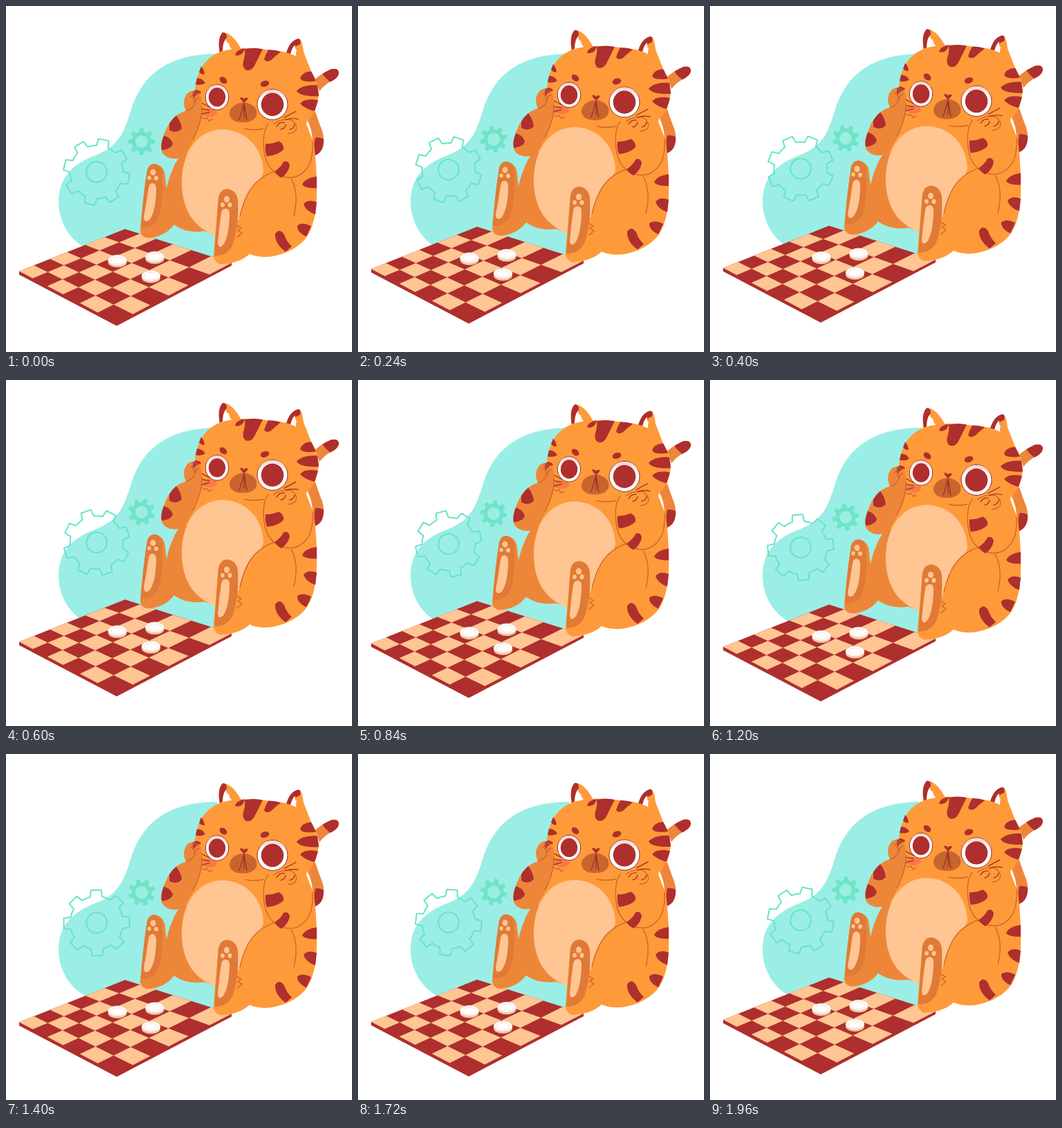
Write an HTML page that moves like this. It is 500 by 500 pixels and loops after 2 s.

```html
<!DOCTYPE html>
<html lang="en">
<head>
<meta charset="utf-8">
<title>Cat at the board</title>
<style>
html, body { margin: 0; width: 100%; height: 100%; overflow: hidden; background: #fff; }
svg { display: block; width: 100vw; height: 100vh; }
.main { fill: #fe9a39; }
.shade { fill: #ee8639; }
.sole { fill: #e07a36; }
.dark { fill: #ae2f2d; }
.peach { fill: #ffc592; }
.white { fill: #fff; }
.line { fill: none; stroke: #c8602c; stroke-width: 1.2; stroke-linecap: round; stroke-linejoin: round; }
.ink { fill: none; stroke: #9b2a26; stroke-width: 1.2; stroke-linecap: round; stroke-linejoin: round; }
</style>
</head>
<body>
<svg viewBox="0 0 500 500">
  <defs>
    <g id="piece">
      <ellipse cy="3" rx="13.5" ry="7.5" fill="#f3c6a2"/>
      <ellipse rx="13.5" ry="7.5" class="white" stroke="#ecd0bd" stroke-width=".8"/>
      <ellipse cy=".4" rx="9.5" ry="5" fill="none" stroke="#f0ddd2" stroke-width=".9"/>
    </g>
    <clipPath id="tailClip"><path d="M447 105Q458 96 470 91Q480 89 481 96Q481 102 473 107Q460 113 453 123Z"/></clipPath>
  </defs>

  <path fill="#9beee5" d="M305 69C235 69 198 99 182 146C171 181 165 203 126 217C90 232 76 252 76 284C77 316 94 342 125 355L312 370L340 180Z"/>

  <g id="scene">
    <g fill="none" stroke="#67e4c6" stroke-width="2" stroke-linejoin="round" transform="translate(131 239.5)">
      <path id="bigGear"/>
      <circle r="14.8"/>
    </g>
    <g transform="translate(196 195.7)"><path id="smallGear" fill="#70e4c6" fill-rule="evenodd"/></g>

    <path class="dark" d="M19 383L172 322L326 371V375L160 462L19 388Z"/>
    <path id="cells" class="peach"/>
    <use href="#piece" x="161" y="367"/>
    <use href="#piece" x="215" y="362"/>
    <use href="#piece" x="209.5" y="389.5"/>

    <!-- tail -->
    <path class="shade" d="M447 105Q458 96 470 91Q480 89 481 96Q481 102 473 107Q460 113 453 123Z"/>
    <path class="dark" clip-path="url(#tailClip)" d="M454 92Q459 103 472 112L490 105V85H454Z"/>
    <path class="shade" d="M437 158L447 152Q452 168 457 180Q462 196 456 206Q452 214 444 217L441 201Q446 190 434 164Z"/>
    <path class="dark" d="M447 190Q453 189 459 192Q460 211 446 216Q444 203 447 190Z"/>

    <!-- body and far leg -->
    <path class="main" d="M284 158Q272 184 259 212Q244 252 251 300Q257 321 285 324L304 331L335 357H350Q363 364 382 362Q413 357 431 338Q451 316 449 255Q448 196 436 160Z"/>
    <path class="shade" d="M259 212Q247 218 240 238Q228 264 230 302L243 316Q262 329 286 325L304 331L275 240Z"/>
    <path class="shade" d="M204 237Q207 227 216 228Q229 231 230 246Q231 266 238 282L251 300Q240 332 206 335Q194 334 194 323Q198 275 204 237Z"/>
    <path class="sole" d="M204 237Q207 227 216 228Q226 231 226 246Q227 288 220 307Q212 322 195 320Q198 275 204 237Z"/>
    <path class="peach" d="M210 256Q218 254 217 268Q216 298 207 309Q200 314 199 305Q203 284 206 262Q207 257 210 256Z"/>
    <g class="peach">
      <ellipse cx="212.500" cy="240" rx="4" ry="4.500"/>
      <ellipse cx="207" cy="248" rx="2.700" ry="3"/>
      <ellipse cx="217" cy="248.500" rx="3" ry="3.200"/>
    </g>
    <path class="peach" d="M312 178C345 178 371 203 372 240L350 300L330 330L304 332C268 319 253 290 254 250C256 208 278 179 312 178Z"/>

    <!-- near leg -->
    <path class="main" d="M388 239Q362 248 350 270Q341 287 336 310L307 276L300 357Q299 369 309 373Q338 372 353 357L400 300Z"/>
    <path class="line" d="M388 239Q362 248 350 270Q342 285 338 304M412 249Q424 271 416 303"/>
    <path class="sole" d="M307 276Q310 264 320 264Q333 266 335 280Q337 318 327 346Q319 361 301 361Q304 318 307 276Z"/>
    <path class="peach" d="M315 293Q324 290 323 303Q322 333 314 345Q307 352 306 342Q308 319 311 299Q312 294 315 293Z"/>
    <g class="peach">
      <ellipse cx="319" cy="279" rx="4" ry="4.600"/>
      <ellipse cx="313" cy="287" rx="2.800" ry="3.200"/>
      <ellipse cx="323.500" cy="287" rx="3" ry="3.500"/>
    </g>
    <path class="line" d="M334 317L340 321L335 324L341 328L334 334"/>

    <!-- back stripes -->
    <g class="dark">
      <path d="M449 246Q433 248 428 257Q430 263 449 263Z"/>
      <path d="M449 283Q436 278 430 286Q433 296 447 301Z"/>
      <path d="M441 318Q428 311 421 317Q420 326 434 333Z"/>
      <path d="M413 347Q405 340 402 330Q395 320 389 329Q388 343 404 355Z"/>
    </g>

    <!-- ears -->
    <path class="main" d="M308 67Q306 47 313 38Q326 37 340 62L330 72Z"/>
    <path class="dark" d="M309 66Q305 46 313 38Q319 37 319 45Q315 51 315 64Z"/>
    <path class="white" d="M313 66Q313 52 318 47Q318 53 322 53Q322 58 327 63Z"/>
    <path class="main" d="M404 74Q410 50 423 47Q428 48 430 66L441 94Z"/>
    <path class="dark" d="M404 71Q409 50 422 47Q427 47 425 55Q413 59 411 73Z"/>
    <path class="white" d="M410 75Q412 60 418 56Q417 62 420 64Q418 68 420 78Z"/>

    <!-- head -->
    <path class="main" d="M273 126C273 97 288 68 322 63Q345 58 385 64Q423 66 437 89Q450 104 452 126Q450 151 437 165Q415 182 350 180Q294 181 279 154Q273 144 273 126Z"/>
    <g class="dark">
      <path d="M331 70Q333 63 345 61Q343 70 336 71Q332 72 331 70Z"/>
      <path d="M345 62Q358 59 371 62Q366 72 359 86Q354 95 346 92Q340 87 344 76Q346 68 345 62Z"/>
      <path d="M379 63Q390 63 397 66Q389 72 383 78Q376 82 373 77Q375 70 379 63Z"/>
      <path d="M282 87Q286 91 287 98Q283 100 279 95Z"/>
      <path d="M276 104Q284 104 288 111Q283 115 274 113Z"/>
      <path d="M273 121Q280 121 282 125Q279 128 273 127Z"/>
      <path d="M441 94Q428 95 425 104Q428 111 448 108Z"/>
      <path d="M450 114Q429 113 420 122Q424 131 452 130Z"/>
      <path d="M451 136Q432 132 425 141Q432 148 446 152Z"/>
      <ellipse cx="314" cy="107" rx="6" ry="4.200" transform="rotate(40 314 107)"/>
      <ellipse cx="374" cy="112" rx="6.500" ry="4.300" transform="rotate(-18 374 112)"/>
    </g>
    <ellipse cx="294" cy="154" rx="11" ry="6" fill="#fb7a43"/>
    <g stroke="#9b2a26">
      <ellipse cx="305" cy="131.500" rx="16.700" ry="18.200" class="white"/>
      <ellipse cx="385" cy="142" rx="22" ry="22" class="white"/>
    </g>
    <path fill="#f7dcda" d="M289 128Q292 114 305 114Q318 115 321 128Q314 118 305 118Q295 118 289 128ZM364 137Q369 120.500 385 120.500Q402 121 406 137Q398 125 385 125Q371 125 364 137Z"/>
    <ellipse class="dark" cx="305" cy="131.500" rx="12.200" ry="13.700"/>
    <ellipse class="dark" cx="385" cy="142" rx="16.300" ry="16.700"/>
    <path fill="#c8652f" d="M343 139Q350 139 357 144Q364 149 362 158Q358 168 342 168Q326 168 323 157Q322 148 332 142Q338 139 343 139Z"/>
    <path class="dark" d="M338 132Q342 131 344 134Q346 131 350 133Q347 138 344 139Q340 137 338 132Z"/>
    <path class="ink" d="M344 137V141L337 164M344 141L348 164M344 142V161M281 139L295 146M281 148L294 150M283 156L294 153"/>
    <path class="line" d="M345 177Q358 180 372 177M282 160L287 163L290 161L294 166L298 163"/>

    <!-- far arm -->
    <path class="shade" d="M263 125Q272 119 280 126Q284 134 283 148Q284 165 273 188Q265 208 254 219Q235 224 226 212Q221 201 231 179Q240 157 260 151Q253 136 263 125Z"/>
    <path class="dark" d="M236 170Q240 163 246 158Q253 167 254 177Q246 185 236 179ZM228 187Q237 189 241 198Q240 206 225 208Q223 199 228 187Z"/>
    <path class="line" d="M261 151Q272 148 274 136M267 131Q271 127 276 127M271 138Q275 133 279 132M283 145Q284 166 270 193"/>
    <path class="dark" d="M270 123Q278 120 281 125Q275 127 270 135Z" opacity=".75"/>

    <!-- near arm -->
    <path class="main" d="M376 174Q387 161 401 164Q420 165 421 179L438 170Q444 205 438 229Q426 248 409 249Q382 244 374 221Q370 195 376 174Z"/>
    <path class="line" d="M379 170Q370 181 373 209Q376 236 397 245Q422 254 437 231Q444 219 443 196M387 170Q398 162 412 164Q422 171 419 179Q415 184 408 184"/>
    <path class="ink" d="M391 174Q395 167 402 168M397 178Q403 177 404 171M410 178Q416 177 417 171M402 161L419 152M404 164Q412 161 422 163"/>
    <path class="dark" d="M375 199Q386 199 394 195Q402 199 401 207Q394 215 377 217Q374 209 375 199ZM388 239Q398 232 401 225Q408 222 410 230Q408 241 398 248Q392 245 388 239Z"/>
    <path class="white" d="M435 165Q442 177 443 193Q438 181 434 170Z"/>
  </g>
</svg>
<script>
const $ = id => document.getElementById(id);
const LOOP = 2000, STEP = 40, TEETH = 8;

function gearPath(outer, root) {
  const points = [];
  for (let i = 0; i < TEETH; i++)
    for (const [deg, r] of [[-13, root], [-9, outer], [9, outer], [13, root], [22.5, root]]) {
      const a = (i * 360 / TEETH + deg) * Math.PI / 180;
      points.push((r * Math.sin(a)).toFixed(2) + " " + (-r * Math.cos(a)).toFixed(2));
    }
  return "M" + points.join("L") + "Z";
}

// Board corners: near, right, left, far; cells widen to the right and shrink to the left.
const near = [160, 457], right = [326, 371], left = [19, 383], far = [172, 322];
const bend = (s, k) => s + k * s * (1 - s);
function corner(i, j) {
  const u = bend(i / 6, -.19), v = bend(j / 6, .2);
  return [0, 1].map(k => ((1 - u) * (1 - v) * near[k] + u * (1 - v) * right[k] +
    (1 - u) * v * left[k] + u * v * far[k]).toFixed(2)).join(" ");
}

let cells = "";
for (let i = 0; i < 6; i++)
  for (let j = 0; j < 6; j++)
    if ((i + j) % 2)
      cells += "M" + [corner(i, j), corner(i + 1, j), corner(i + 1, j + 1), corner(i, j + 1)].join("L") + "Z";

$("cells").setAttribute("d", cells);
$("bigGear").setAttribute("d", gearPath(48, 38.5));
$("smallGear").setAttribute("d", gearPath(19.5, 14.5) + "M9 0A9 9 0 1 0 -9 0A9 9 0 1 0 9 0Z");

function draw(now) {
  const t = Math.floor(now % LOOP / STEP) * STEP;
  const bob = -4.8 * Math.sin(2 * Math.PI * (t - 20) / LOOP);
  const turn = 45 * t / LOOP;
  $("scene").setAttribute("transform", `translate(0 ${bob.toFixed(2)})`);
  $("bigGear").setAttribute("transform", `rotate(${12.5 + turn})`);
  $("smallGear").setAttribute("transform", `rotate(${-2 * turn})`);
  requestAnimationFrame(draw);
}
draw(performance.now());
</script>
</body>
</html>
```
